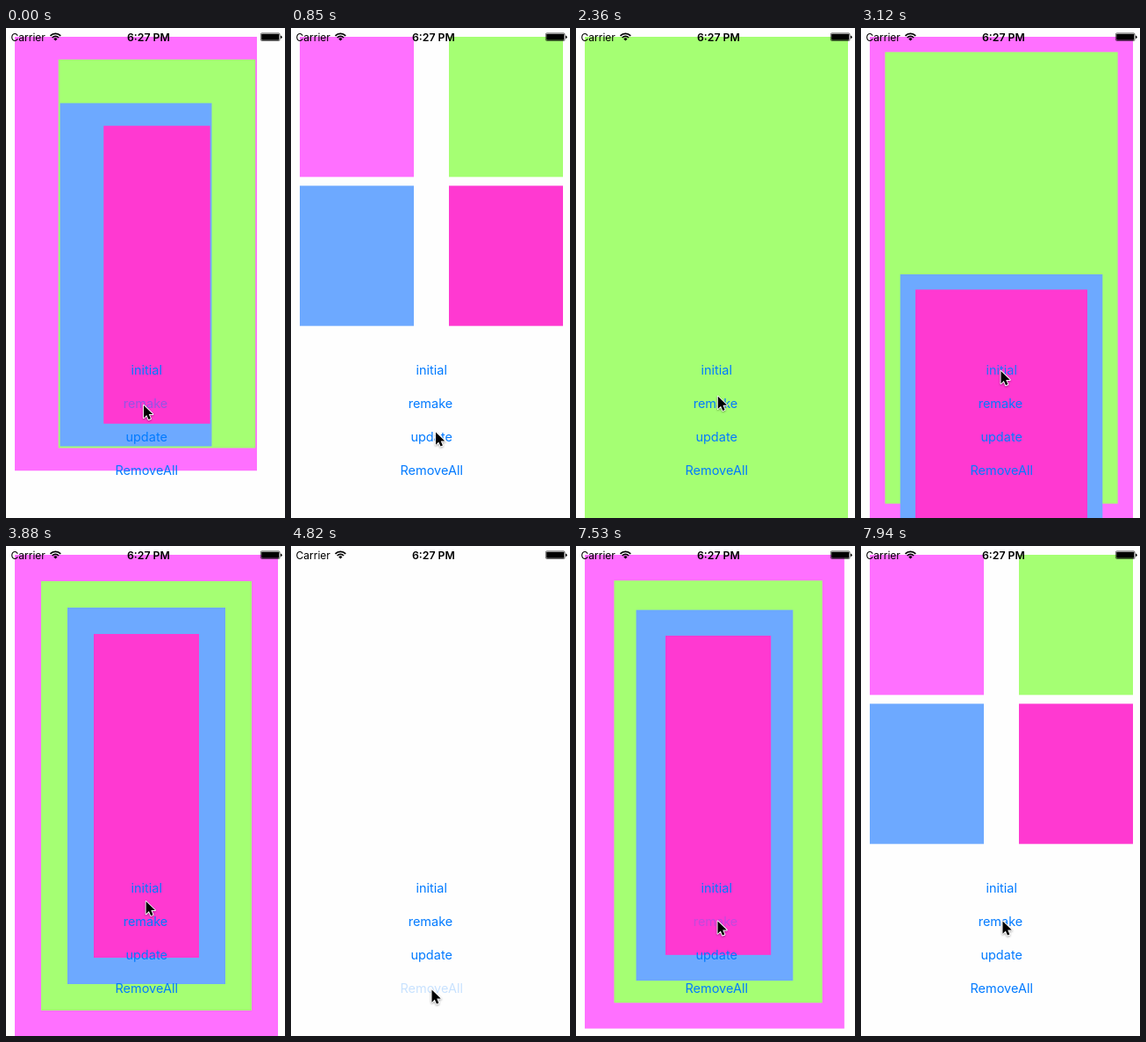
An HTML page that plays this animation: 318 by 557 pixels, repeating every 8 s.

```html
<!DOCTYPE html>
<html lang="en">
<head>
<meta charset="utf-8">
<title>Layout transitions</title>
<style>
  html, body { margin: 0; width: 100%; height: 100%; overflow: hidden; background: #fefefe; }
  svg { display: block; width: 318px; height: 557px; }
  text { font-family: Inter, Roboto, sans-serif; }
  .buttons { font-size: 14.5px; fill: #007aff; text-anchor: middle; }
  .status { font-size: 12px; }
  .time { font-size: 12.3px; font-weight: 600; text-anchor: middle; }
  .cursor { filter: drop-shadow(0 1px 1px rgba(0, 0, 0, .35)); }
</style>
</head>
<body>
<svg viewBox="0 0 318 557">
  <g id="views"></g>
  <g class="buttons" id="buttons"></g>
  <g class="status">
    <text x="5.6" y="14.5">Carrier</text>
    <text class="time" x="162.4" y="14.5">6:27 PM</text>
    <g fill="none" stroke="#000" stroke-width="1.7">
      <path d="M50.5 8.8a8.4 8.4 0 0 1 11.8 0"/>
      <path d="M52.7 11a5.2 5.2 0 0 1 7.4 0"/>
    </g>
    <path d="M54.3 12.4a3 3 0 0 1 4.2 0l-2.1 2.1z"/>
    <rect x="290.4" y="5.9" width="21.6" height="8.6" rx="1.2" fill="none" stroke="#000" stroke-width=".6"/>
    <rect x="291.2" y="6.7" width="20" height="7" rx=".6"/>
    <path d="M313 8.4q1.6.4 1.6 1.8t-1.6 1.8z"/>
  </g>
  <path class="cursor" id="cursor" d="M0 0V14.2l3.3-3.2 2.2 5.1 2.4-1-2.2-5.1h4.6z"
    stroke="#fff" stroke-width="1.8" stroke-linejoin="round" paint-order="stroke"/>
</svg>
<script>
const LOOP = 8000, MOVE = 460, FADE = 330, HOLD = 210;
const INITIAL = 0, REMAKE = 1, UPDATE = 2, REMOVE = 3;

// A layout gives x, y, width, height of view i.
const nested = i => [10 + 30 * i, 10 + 30 * i, 300 - 60 * i, 548 - 60 * i];
const grid = i => [10 + 170 * (i % 2), 10 + 169.33 * (i >> 1), 130, 159.33];
const stacked = i => [10, i < 2 ? 10 : 568, 300, 548];
const empty = () => [0, 0, 0, 0];

// The pointer sets off at `go`, travels to `aim`, and releases the button at `at`.
const taps = [
  { go: -600, travel: 300, aim: [157, 429], at: -119, button: REMAKE, layout: grid },
  { go: 370, travel: 270, aim: [165, 459.5], at: 1294.5, button: UPDATE, layout: stacked },
  { go: 1980, travel: 680, aim: [159.5, 390], at: 2870, button: INITIAL, layout: nested },
  { go: 3740, travel: 730, aim: [160.5, 504.5], at: 4800, button: REMOVE, layout: empty, snap: true },
  { go: 5130, travel: 900, aim: [159.5, 390], at: 6227, button: INITIAL, layout: nested },
  { go: 6870, travel: 410, aim: [161.5, 426.5], at: 7480, button: REMAKE, layout: grid }
];

const mix = (a, b, p) => a + (b - a) * p;
const blend = (a, b, p) => a.map((v, k) => mix(v, b[k], p));
const clamp = v => Math.min(1, Math.max(0, v));

// cubic-bezier(.42, 0, .58, 1), solved by bisection
function ease(x) {
  if (x <= 0 || x >= 1) return clamp(x);
  let lo = 0, hi = 1, s = .5;
  for (let i = 0; i < 24; i++) {
    s = (lo + hi) / 2;
    const u = 1 - s;
    if (3 * u * s * (.42 * u + .58 * s) + s ** 3 < x) lo = s; else hi = s;
  }
  return s * s * (3 - 2 * s);
}

function add(parent, name, attrs) {
  const el = document.createElementNS('http://www.w3.org/2000/svg', name);
  set(el, attrs);
  return document.getElementById(parent).appendChild(el);
}

function set(el, attrs) {
  for (const key in attrs) el.setAttribute(key, attrs[key]);
}

const views = ['#ff70ff', '#a5ff73', '#6da9ff', '#ff39d1'].map(fill => add('views', 'rect', { fill }));
const labels = ['initial', 'remake', 'update', 'RemoveAll'].map((title, i) => {
  const label = add('buttons', 'text', { x: i === REMAKE ? 159 : 160.2, y: 393.6 + 38 * i });
  label.textContent = title;
  return label;
});
const cursor = document.getElementById('cursor');

function drawViews(t) {
  const n = taps.filter(tap => tap.at <= t).length - 1;
  const { at, layout, snap } = taps[n];
  const before = n ? taps[n - 1].layout : nested;
  const p = snap ? 1 : ease((t - at) / MOVE);
  views.forEach((view, i) => {
    const [x, y, width, height] = blend(before(i), layout(i), p);
    set(view, { x, y, width, height });
  });
}

function drawLabels(t) {
  labels.forEach((label, i) => {
    const tap = taps.filter(tap => tap.button === i && tap.at - HOLD <= t).pop();
    label.style.opacity = tap ? mix(.2, 1, ease((t - tap.at) / FADE)) : 1;
  });
}

function drawCursor(t) {
  const [x, y] = taps.reduce((pos, tap) => {
    const p = clamp((t - tap.go) / tap.travel);
    return blend(pos, tap.aim, mix(p, ease(p), .6));
  }, taps[0].aim);
  set(cursor, { transform: `translate(${x} ${y})` });
}

function draw() {
  const t = performance.now() % LOOP;
  drawViews(t);
  drawLabels(t);
  drawCursor(t);
  requestAnimationFrame(draw);
}
draw();
</script>
</body>
</html>
```
